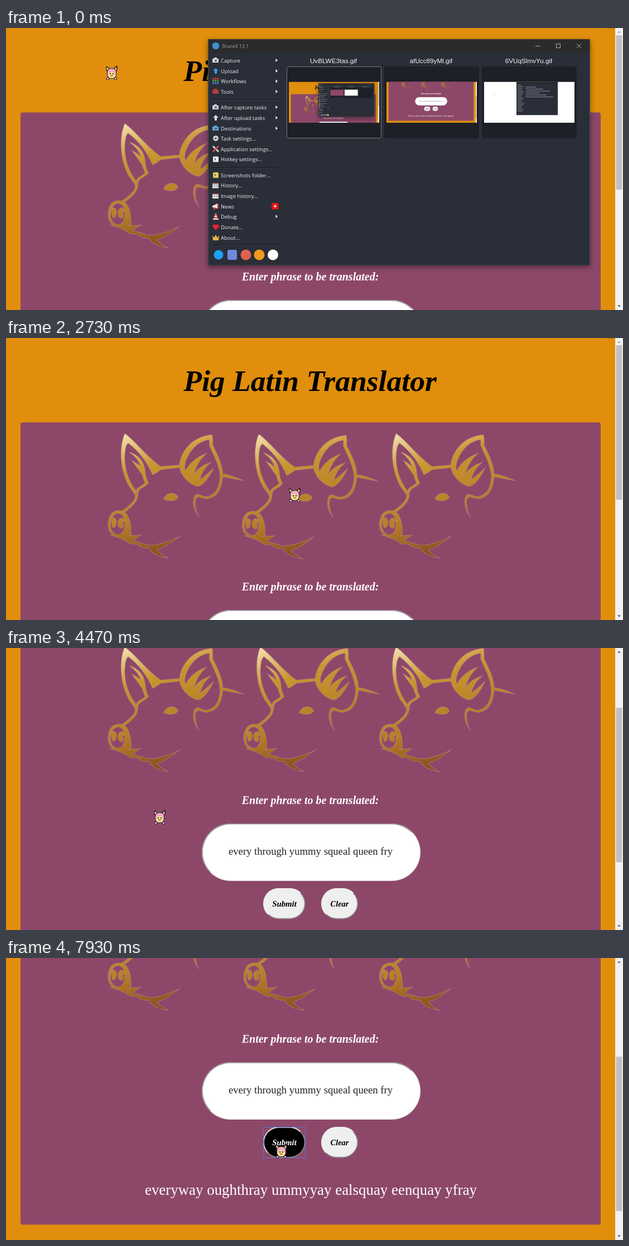
These frames come from a looping animation (1106x506 px, 8 s). An HTML page with a canvas:

```html
<!DOCTYPE html>
<html lang="en">
<head>
<meta charset="utf-8">
<title>Pig Latin Translator</title>
<style>
html, body { margin: 0; width: 100%; height: 100%; overflow: hidden; background: #e08e0b; }
canvas { display: block; }
</style>
</head>
<body>
<canvas id="stage" width="1106" height="506"></canvas>
<script>
const ctx = document.getElementById('stage').getContext('2d');
const W = 1106, H = 506, LOOP = 8000, TICK = 1000 / 15;
const ORANGE = '#e08e0b', PLUM = '#8d4869';
const SERIF = '"Liberation Serif", serif';
const UI = '"Open Sans", sans-serif';

// Each key: time, then values
const cursorKeys = [
  [470, 179, 67], [670, 290, 54], [930, 520, 42], [1130, 700, 46], [1330, 808, 70],
  [1400, 811, 92], [1470, 814, 122], [1740, 814, 122], [1870, 812, 168], [2000, 804, 228],
  [2270, 655, 252], [2600, 545, 266], [3070, 412, 274], [3470, 265, 290],
  [4880, 265, 290], [5000, 276, 260], [5330, 430, 222], [5730, 644, 203], [5930, 705, 222],
  [6050, 712, 246], [6300, 610, 300], [6530, 489, 334], [7870, 489, 334], [7930, 483, 333]
];
const scrollKeys = [[4190, 0], [4270, 56], [4400, 130], [4530, 214], [4660, 284], [4730, 301]];
const shakeKeys = [
  [0, 1, 1, 0], [.1, -1, -2, -1], [.2, -3, 0, 1], [.3, 3, 2, 0], [.4, 1, -1, 1], [.5, -1, 2, -1],
  [.6, -3, 1, 0], [.7, 3, 1, -1], [.8, -1, -1, 1], [.9, 1, 2, 0], [1, 1, -2, -1]
];
// Pig index, shake start, shake end
const hovers = [[2, 1760, 2260], [1, 2260, 3070], [0, 3070, 4380]];

function track(keys, t) {
  if (t <= keys[0][0]) return keys[0].slice(1);
  for (let i = 1; i < keys.length; i++) {
    const a = keys[i - 1], b = keys[i];
    if (t <= b[0]) {
      const k = (t - a[0]) / (b[0] - a[0]);
      return a.slice(1).map((v, j) => v + (b[j + 1] - v) * k);
    }
  }
  return keys[keys.length - 1].slice(1);
}

function rect(x, y, w, h, color) {
  ctx.fillStyle = color;
  ctx.fillRect(x, y, w, h);
}

function round(x, y, w, h, r, color) {
  ctx.fillStyle = color;
  ctx.beginPath();
  ctx.roundRect(x, y, w, h, r);
  ctx.fill();
}

function disc(x, y, r, color) {
  ctx.fillStyle = color;
  ctx.beginPath();
  ctx.arc(x, y, r, 0, 7);
  ctx.fill();
}

function poly(color, ...p) {
  ctx.fillStyle = color;
  ctx.beginPath();
  for (let i = 0; i < p.length; i += 2) ctx.lineTo(p[i], p[i + 1]);
  ctx.fill();
}

function text(str, x, y, font, color, align = 'center') {
  ctx.font = font;
  ctx.fillStyle = color;
  ctx.textAlign = align;
  ctx.fillText(str, x, y);
}

const pigFill = new Path2D([
  // left ear and brow
  'M213 172C203 195 204 236 221 266Q228 275 232 282L235 277C220 260 210 232 213 206Q214 192 219 188',
  'C240 204 254 224 263 245Q270 242 277 236L312 232V228L277 231C252 214 232 185 213 172Z',
  // left ear folds
  'M222 205C236 211 247 219 249 238Q250 252 255 260C247 270 238 267 236 279Q238 296 208 315',
  'L204 313Q234 294 232 282C234 264 244 268 250 260Q246 252 245 246Q235 232 227 221Q238 227 243 233Q238 216 222 205Z',
  // right ear
  'M311 229C314 203 334 177 369 174Q371 181 370 192C380 212 390 232 388 250C386 274 376 286 361 288',
  'C350 289 344 279 339 290Q338 304 343 316Q334 303 337 287C342 273 351 287 360 285C375 282 383 269 384 250',
  'C384 232 374 212 365 193V182C341 185 329 203 322 220Q318 232 322 239Q332 218 358 208Q340 225 336 248',
  'Q342 232 366 224Q351 236 347 255Q357 248 371 235Q357 263 344 266C328 262 313 247 311 229Z',
  // tail and eye
  'M387 244Q403 246 423 255Q405 252 387 248Z',
  'M283 289C288 278 300 275 308 285C305 293 293 293 283 289Z',
  // nostrils
  'M191 323C197 322 199 329 197 333Q197 340 192 340C189 335 189 327 191 323Z',
  'M207 323C213 325 212 330 208 332Q213 339 207 341C199 340 199 325 207 323Z',
  // chin
  'M190 354Q203 354 211 356Q226 355 240 354Q230 360 227 364Q240 367 250 371Q269 376 308 358',
  'Q288 374 270 380Q276 388 288 394C274 391 262 387 256 376Q242 378 235 369Q222 371 217 365Q207 359 190 354Z'
].join(''));
const snout = new Path2D('M186 321C191 308 207 307 216 316C224 329 223 340 224 353Q213 359 200 357C182 352 181 334 186 321Z' +
  'M189 324C184 339 188 350 199 353C208 355 214 345 213 332C213 310 194 310 189 324Z');

function drawPig(index, t) {
  const hover = hovers.find(h => h[0] === index && t >= h[1] && t < h[2]);
  ctx.save();
  ctx.translate(index * 243.2, 0);
  if (hover) {
    const [dx, dy, deg] = track(shakeKeys, (t - hover[1]) / 800 % 1);
    ctx.translate(303 + dx, 283 + dy);
    ctx.rotate(deg * Math.PI / 180);
    ctx.translate(-303, -283);
  }
  const gold = ctx.createLinearGradient(205, 176, 275, 396);
  gold.addColorStop(0, '#f2dfab');
  gold.addColorStop(.28, '#c9962f');
  gold.addColorStop(.65, '#b87f27');
  gold.addColorStop(1, '#864b20');
  ctx.strokeStyle = 'rgba(208,170,140,.55)';
  ctx.lineWidth = 1.6;
  ctx.stroke(pigFill);
  ctx.stroke(snout);
  ctx.fillStyle = gold;
  ctx.fill(pigFill);
  ctx.fill(snout, 'evenodd');
  ctx.restore();
}

function bevel(x, y, w, h, topLeft, bottomRight, fill) {
  const r = h / 2;
  round(x, y, w, h, r, bottomRight);
  ctx.save();
  ctx.beginPath();
  ctx.moveTo(x, y);
  ctx.lineTo(x + w, y);
  ctx.lineTo(x + w - r, y + r);
  ctx.lineTo(x + r, y + r);
  ctx.lineTo(x, y + h);
  ctx.clip();
  round(x, y, w, h, r, topLeft);
  ctx.restore();
  round(x + 1.7, y + 1.7, w - 3.4, h - 3.4, r - 1.7, fill);
}

function arrow(x, y, dir, color) {
  poly(color, x - 3, y + 1.5 * dir, x + 3, y + 1.5 * dir, x, y - 1.5 * dir);
}

function drawPage(t, scroll) {
  rect(0, 0, W, H, ORANGE);
  ctx.save();
  ctx.translate(0, -scroll);
  text('Pig Latin Translator', 545, 95, `italic bold 53.6px ${SERIF}`, '#000');
  round(26, 151.5, 1040, 628, 4, PLUM);
  for (let i = 0; i < 3; i++) drawPig(i, t);
  text('Enter phrase to be translated:', 545.5, 453, `italic bold 20px ${SERIF}`, '#fff');

  bevel(351, 488, 392, 103, '#9a9a9a', '#ededed', '#fff');
  text('every through yummy squeal queen fry', 546, 544, `18.7px ${SERIF}`, '#222');

  const hot = t >= 6430;
  bevel(461, 604, 75.5, 55.5, '#efefef', '#8d8d8d', hot ? '#000' : '#efefef');
  bevel(565, 604, 66, 55.5, '#efefef', '#8d8d8d', '#efefef');
  text('Submit', 499, 637, `italic bold 14.8px ${SERIF}`, hot ? '#fff' : '#000');
  text('Clear', 598, 637, `italic bold 14.4px ${SERIF}`, '#000');
  if (t >= 7325) {
    ctx.strokeStyle = '#5a78c4';
    ctx.lineWidth = 1;
    ctx.strokeRect(461.5, 604.5, 75, 55);
  }
  if (t >= 7525) text('everyway oughthray ummyyay ealsquay eenquay yfray', 546.5, 726, `26.9px ${SERIF}`, '#fff');
  else text('This is where your translated sentence will appear.', 545.5, 726, `27.7px ${SERIF}`, '#fff');
  ctx.restore();

  rect(1092, 0, 14, H, '#f1f1f1');
  rect(1093.5, 13 + scroll * .545, 11, 277, '#c1c1c1');
  arrow(1099, 7, 1, scroll ? '#505050' : '#a3a3a3');
  arrow(1099, 499, -1, '#505050');
  if (!scroll) rect(1076, 0, 16, 1, '#b8740f');
}

// Label, row centre, icon colours, icon kind, submenu
const menu = [
  ['Capture', 58, '#d5d8dc', 'box', 1], ['Upload', 77, '#39a0e8', 'up', 1],
  ['Workflows', 95.5, '#d33a3a', 'grid', 1], ['Tools', 114, '#c73535', 'box', 1],
  ['After capture tasks', 142, '#c9ced6', 'box', 1], ['After upload tasks', 161, '#d8dde4', 'up', 1],
  ['Destinations', 180, '#5aa7df', 'box', 1], ['Task settings...', 198, '#d6d6d6', 'gear'],
  ['Application settings...', 217, '#c94b4b', 'cross'], ['Hotkey settings...', 235.5, '#ececec', 'key'],
  ['Screenshots folder...', 264, '#e9c95a', 'key'], ['History...', 282.5, '#e4e4e4', 'list'],
  ['Image history...', 301, '#e4e4e4', 'list'], ['News', 320, '#e8e2e2', 'horn'],
  ['Debug', 338, '#e05a5a', 'cone', 1], ['Donate...', 357, '#e8252f', 'heart'],
  ['About...', 376, '#e5b13c', 'crown']
];

const icons = {
  box(c) { rect(-6, -3, 11, 7, c); rect(-3, -5, 5, 2, c); rect(-2, -1, 4, 3, '#59616d'); },
  up(c) { poly(c, -5, 0, 0, -5, 5, 0, 2, 0, 2, 5, -2, 5, -2, 0); },
  grid(c) {
    for (let i = 0; i < 9; i++) rect(i % 3 * 4 - 6, Math.floor(i / 3) * 4 - 6, 3, 3, [c, '#4d9c4d', '#4277cc'][Math.floor(i / 3)]);
  },
  gear(c) {
    for (let i = 0; i < 8; i++) disc(4 * Math.cos(i * Math.PI / 4), 4 * Math.sin(i * Math.PI / 4), 1.3, c);
    disc(0, 0, 4, c); disc(0, 0, 1.6, '#2a2e38');
  },
  cross(c) { poly('#d9d9d9', -6, -4, -4, -6, 6, 4, 4, 6); poly(c, 4, -6, 6, -4, -4, 6, -6, 4); },
  key(c) { round(-5, -5, 10, 10, 1.5, c); rect(-2, -2, 2, 4, '#6d7683'); },
  list(c) { rect(-6, -4, 11, 9, c); rect(-6, -4, 11, 2, '#b8695a'); rect(-4, 0, 3, 2, '#718daa'); rect(1, 0, 3, 2, '#718daa'); },
  horn(c) { poly(c, -6, -1, 3, -5, 3, 4, -6, 2); rect(3, -5, 2, 9, '#d33'); rect(-4, 2, 3, 4, '#d33'); },
  cone(c) { poly(c, -1, -6, 1, -6, 4, 4, -4, 4); rect(-5, 4, 10, 2, '#eee'); rect(-2, -1, 4, 2, '#eee'); },
  heart(c) { disc(-2.6, -1.5, 3, c); disc(2.6, -1.5, 3, c); poly(c, -5.4, 0, 5.4, 0, 0, 6); },
  crown(c) { poly(c, -6, -4, -3, 0, 0, -5, 3, 0, 6, -4, 5, 5, -5, 5); }
};

function drawThumb(x, paint) {
  ctx.save();
  ctx.beginPath();
  ctx.rect(x, 96.5, 162, 73.5);
  ctx.clip();
  ctx.translate(x, 96.5);
  ctx.scale(162 / W, 162 / W);
  paint();
  ctx.restore();
}

function drawNotes() {
  rect(0, 0, W, H, '#fff');
  rect(396, 0, 506, 408, '#2a2e38');
  rect(396, 0, 506, 24, '#2b2b2b');
  for (let i = 0; i < 17; i++) rect(408, 36 + i * 20, 44 + i * 29 % 40, 6, '#8b8f98');
  for (let i = 0; i < 6; i++) rect(510, 62 + i * 24, 130 + i * 83 % 210, 7, '#8b8f98');
  disc(118, 158, 8, '#ddd');
}

function drawWindow(withThumbs) {
  ctx.save();
  ctx.shadowColor = 'rgba(0,0,0,.45)';
  ctx.shadowBlur = 9;
  ctx.shadowOffsetY = 3;
  rect(362, 20, 685, 406, '#4b4e55');
  ctx.restore();
  rect(363, 20.5, 683, 405, '#2a2e38');
  rect(363, 20.5, 683, 23.5, '#2b2b2b');
  disc(376, 32, 6.3, '#3f92d2');
  text('ShareX 13.1', 387, 35.5, `8.8px ${UI}`, '#a0a0a0', 'left');
  rect(949, 32, 9, 1, '#aaa');
  ctx.strokeStyle = '#aaa';
  ctx.lineWidth = 1;
  ctx.strokeRect(986.5, 28.5, 7, 7);
  ctx.beginPath();
  ctx.moveTo(1023, 28); ctx.lineTo(1031, 36);
  ctx.moveTo(1031, 28); ctx.lineTo(1023, 36);
  ctx.stroke();

  for (const [label, y, color, kind, sub] of menu) {
    ctx.save();
    ctx.translate(376, y);
    icons[kind](color);
    ctx.restore();
    text(label, 385, y + 3.5, `9.4px ${UI}`, '#f0f0f0', 'left');
    if (sub) poly('#fff', 483.5, y - 3, 487, y, 483.5, y + 3);
  }
  for (const y of [128, 250, 388]) {
    rect(369, y, 120, 1, '#181b21');
    rect(369, y + 1, 120, 1, '#363b47');
  }
  round(476, 314, 12.5, 11.5, 2, '#e01616');
  rect(480, 319, 5, 1.4, '#fff');
  rect(481.8, 317.2, 1.4, 5, '#fff');

  disc(381, 407, 8.5, '#1da1f2');
  round(397, 398, 17, 18, 3, '#7289da');
  disc(430, 407, 9.5, '#e3604f');
  disc(454, 407, 9.5, '#f09a20');
  disc(478.5, 407, 9.5, '#fff');

  ['UvBLWE3tas.gif', 'afUcc89yMl.gif', '6VUqSlmvYu.gif'].forEach((name, i) => {
    const x = 503 + i * 175;
    text(name, x + 84, 63, '11.7px "Liberation Sans", sans-serif', '#f4f4f4');
    round(x, 69, 170, 129, 4, '#1d2027');
  });
  ctx.setLineDash([1, 1]);
  ctx.strokeStyle = '#d8d8d8';
  ctx.beginPath();
  ctx.roundRect(503.5, 69.5, 169, 128, 3);
  ctx.stroke();
  ctx.setLineDash([]);
  if (!withThumbs) {
    rect(507, 96.5, 162, 73.5, PLUM);
    rect(682, 96.5, 162, 73.5, '#fff');
    return;
  }
  drawThumb(507, () => { drawPage(0, 0); drawWindow(false); });
  drawThumb(682, () => drawPage(0, 301));
  drawThumb(857, drawNotes);
}

function drawCursor([x, y]) {
  ctx.save();
  ctx.translate(Math.round(x), Math.round(y));
  const ink = '#32202c', pink = '#f5a9c5', cream = '#f7e08f';
  poly(ink, 0, 2, 3, 2, 9, 8, 4, 14, 1, 10);
  poly(ink, 20, 0, 21, 3, 20, 10, 17, 13, 12, 7);
  poly(cream, 1, 4, 3, 4, 7, 8, 4, 12);
  poly(cream, 19, 3, 19, 9, 17, 11, 14, 8);
  round(2, 5, 17, 19, 7, ink);
  round(3, 6, 15, 17, 6, pink);
  round(4.5, 12, 12, 11, 5, cream);
  rect(7, 14, 2, 2, ink);
  rect(12, 14, 2, 2, ink);
  round(8, 17, 5, 3, 1.5, '#c98a55');
  for (const fx of [1, 15]) {
    rect(fx, 22, 5, 4, ink);
    rect(fx + 1, 23, 3, 2, '#fff');
  }
  ctx.restore();
}

function frame(now) {
  const t = Math.floor((now % LOOP + 4) / TICK) * TICK;
  drawPage(t, track(scrollKeys, t)[0]);
  if (t < 130) drawWindow(true);
  drawCursor(track(cursorKeys, t));
}

const start = performance.now();
(function loop() {
  frame(performance.now() - start);
  requestAnimationFrame(loop);
})();
</script>
</body>
</html>
```
